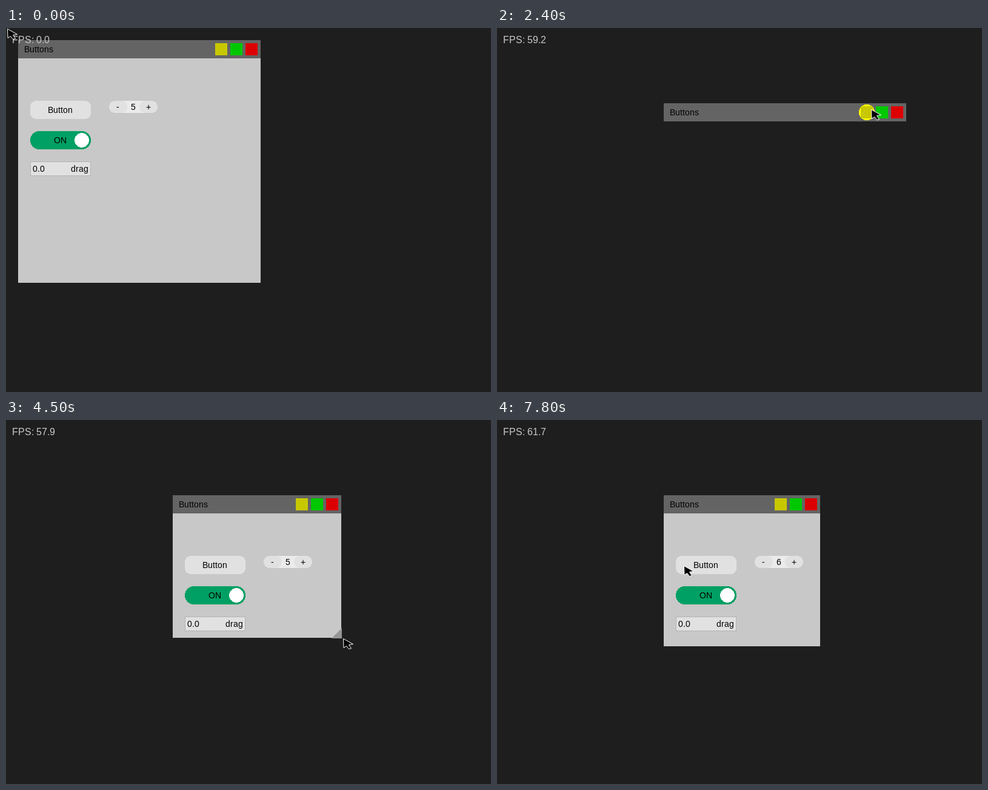
An HTML page with a canvas for the animation above (8000 ms loop, 800 px wide and 600 px high).

```html
<!DOCTYPE html>
<html>
<head>
<meta charset="utf-8">
<style>
html, body { margin: 0; width: 100%; height: 100%; overflow: hidden; background: #1e1e1e; }
canvas { display: block; }
</style>
</head>
<body>
<canvas id="stage" width="800" height="600"></canvas>
<script>
const ctx = document.getElementById('stage').getContext('2d');
const LOOP = 8000, STEP = 100;

// Steps at which the pointer acts
const GRAB = 4, DROP = 17, FOLD = 22, UNFOLD = 27, RESIZE = 33, RELEASE = 49, COUNT = 61;

// Key points: step, then values
const pointerKeys = [
  [0, 2, 1], [GRAB, 157, 33], [6, 286, 120], [7, 262, 164], [9, 157, 105], [12, 279, 54],
  [DROP, 412, 137], [FOLD, 617, 134], [UNFOLD, 617, 134], [31, 691, 528],
  [RESIZE, 678, 525], [36, 657, 477], [40, 541, 242], [45, 556, 360],
  [RELEASE, 536, 374], [51, 536, 374], [56, 490, 238], [64, 490, 242], [69, 457, 241], [79, 305, 240]
];
const fpsKeys = [[0, 0], [1, 60.3], [12, 62.1], [24, 59.2], [36, 60.6], [40, 58.1], [51, 57.8], [78, 61.7], [79, 61.7]];

const clamp = (v, lo, hi) => Math.min(hi, Math.max(lo, v));

// Smooth curve through the keys that never overshoots them
function curve(keys, k, axis) {
  const slope = i => keys[i] && keys[i + 1]
    ? (keys[i + 1][axis] - keys[i][axis]) / (keys[i + 1][0] - keys[i][0]) : 0;
  const tangent = i => {
    const a = slope(i - 1), b = slope(i);
    return a * b > 0 ? 2 * a * b / (a + b) : 0;
  };
  const i = keys.findIndex((p, n) => n && k <= p[0]) - 1;
  const span = keys[i + 1][0] - keys[i][0], f = (k - keys[i][0]) / span, g = 1 - f;
  return keys[i][axis] * g * g * (1 + 2 * f) + keys[i + 1][axis] * f * f * (3 - 2 * f)
    + span * f * g * (tangent(i) * g - tangent(i + 1) * f);
}

const pointerAt = k => ({
  x: Math.round(curve(pointerKeys, k, 1)),
  y: Math.round(curve(pointerKeys, k, 2))
});

// Rounded boxes are filled row by row to keep hard pixel edges
function box(x, y, w, h, color, r = 0) {
  ctx.fillStyle = color;
  ctx.fillRect(x, y + r, w, h - 2 * r);
  for (let i = 0; i < r; i++) {
    const inset = Math.round(r - Math.sqrt(r * r - (r - i - 0.5) ** 2));
    ctx.fillRect(x + inset, y + i, w - 2 * inset, 1);
    ctx.fillRect(x + inset, y + h - 1 - i, w - 2 * inset, 1);
  }
}

const disc = (x, y, r, color) => box(x - r, y - r, 2 * r, 2 * r, color, r);

function poly(points, color) {
  ctx.fillStyle = color;
  ctx.beginPath();
  points.forEach(([x, y]) => ctx.lineTo(x, y));
  ctx.closePath();
  ctx.fill();
}

// Letters advance by whole pixels
function label(s, x, y, color = '#000', size = 14) {
  ctx.font = size + 'px "Liberation Sans", Arial, sans-serif';
  ctx.fillStyle = color;
  for (const c of s) {
    ctx.fillText(c, x, y);
    x += Math.round(ctx.measureText(c).width);
  }
}

function drawWidgets(count) {
  box(20, 100, 100, 30, '#e1e1e1', 10);
  label('Button', 49, 120);

  box(20, 150, 100, 30, '#00a064', 15);
  label('ON', 59, 170);
  disc(105, 165, 12, '#fff');

  box(20, 200, 100, 24, '#b4b4b4');
  box(21, 201, 98, 22, '#e1e1e1');
  label('0.0', 24, 217);
  label('drag', 87, 217);

  box(150, 100, 80, 20, '#ebebeb', 10);
  box(150, 100, 30, 20, '#e1e1e1', 10);
  box(200, 100, 30, 20, '#e1e1e1', 10);
  label('-', 162, 115);
  label(count, 186, 115);
  label('+', 211, 115);
}

function drawWindow(k, pointer) {
  const held = pointerAt(clamp(k, GRAB, DROP));
  const x = held.x - 137, y = held.y - 13;
  const corner = pointerAt(clamp(k, RESIZE, RELEASE));
  const w = corner.x - 278, h = corner.y - 125;

  ctx.save();
  ctx.translate(x, y);
  if (k < FOLD || k >= UNFOLD) {
    ctx.save();
    ctx.beginPath();
    ctx.rect(0, 0, w, h);
    ctx.clip();
    box(0, 0, w, h, '#c8c8c8');
    drawWidgets(k < COUNT ? '5' : '6');
    ctx.restore();
  }
  box(0, 0, w, 30, '#646464');
  label('Buttons', 10, 20);

  const px = pointer.x - x - w, py = pointer.y - y;
  if (px >= -75 && px < -55 && py >= 5 && py < 25) disc(w - 65, 15, 13, '#ff0');
  ['#dc0000', '#00c800', '#c8c800'].forEach((color, i) => box(w - 25 * (i + 1), 5, 20, 20, color));

  if (k >= RESIZE && k < RELEASE)
    poly([[w - 16, h + 1], [w + 1, h - 16], [w + 1, h + 1]], '#969696');
  ctx.restore();
}

function drawPointer({ x, y }) {
  ctx.save();
  ctx.translate(x + 0.5, y + 0.5);
  poly([[0, 0], [16, 9], [9, 10], [13, 16], [9, 17], [5, 12], [0.5, 15]], '#000');
  ctx.strokeStyle = '#fff';
  ctx.lineJoin = 'round';
  ctx.stroke();
  ctx.restore();
}

function frame() {
  const k = Math.floor(performance.now() % LOOP / STEP);
  const pointer = pointerAt(k);
  box(0, 0, 800, 600, '#1e1e1e');
  drawWindow(k, pointer);
  label('FPS: ' + curve(fpsKeys, k, 1).toFixed(1), 10, 25, '#c8c8c8', 16);
  drawPointer(pointer);
  requestAnimationFrame(frame);
}
frame();
</script>
</body>
</html>
```
